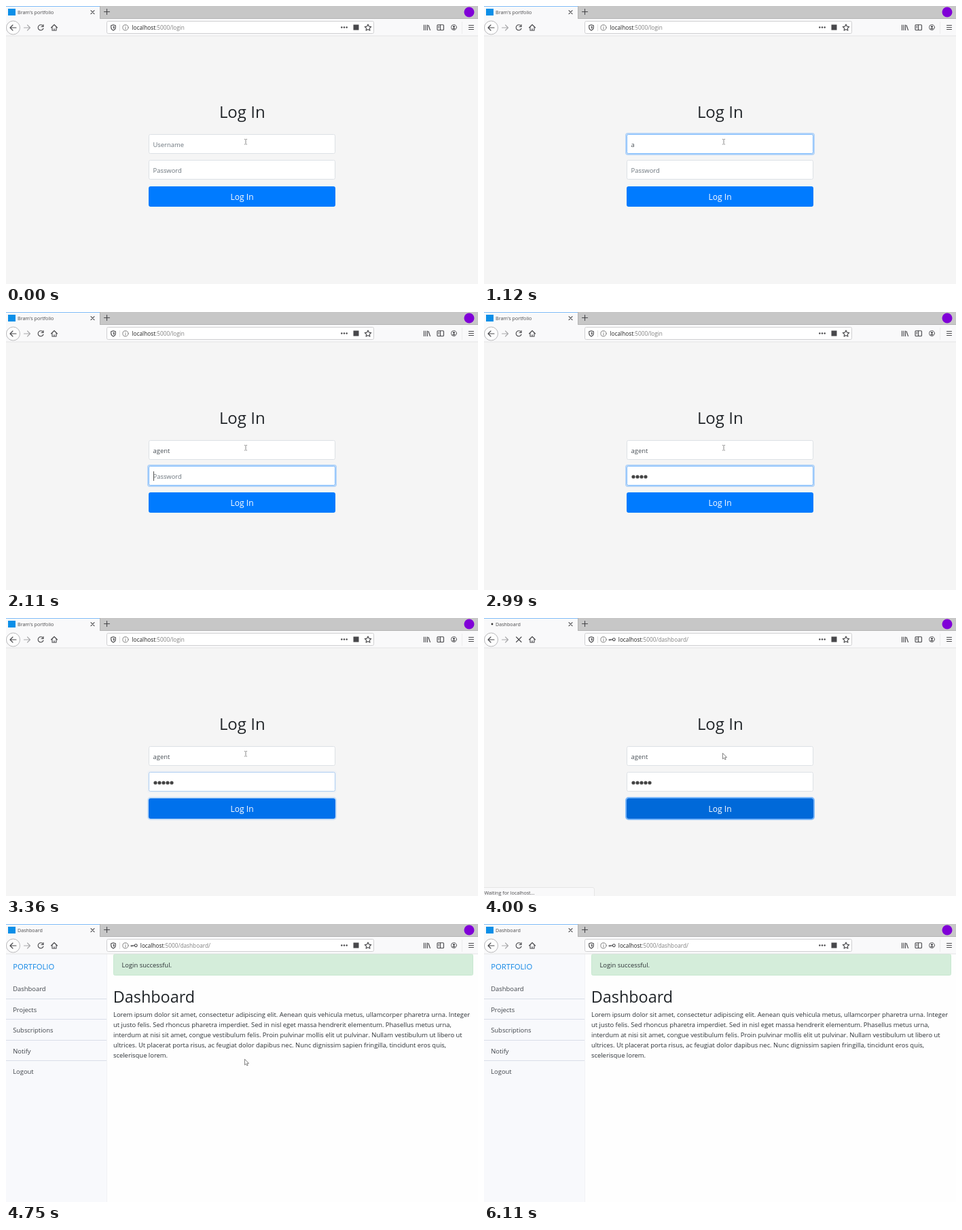
Write an HTML page that moves like this. It is 695 by 410 pixels and loops after 6.25 s.

```html
<!DOCTYPE html>
<html lang="en">
<head>
<meta charset="utf-8">
<title>Login demo</title>
<style>
  html, body { margin: 0; width: 100%; height: 100%; overflow: hidden; background: #f5f5f5; }
  svg { display: block; width: 695px; height: 410px; }
  text { font: 9.41px "Open Sans", "Noto Sans", sans-serif; fill: #2b3035; white-space: pre; }
  .tab { font-size: 7.15px; fill: #4a4a4c; }
  .url { font-size: 8.25px; fill: #808080; }
  .url tspan { fill: #222; }
  .title { font-size: 24px; fill: #212529; }
  .field { fill: #fff; stroke: #dde1e6; }
  .field + text { fill: #495057; }
  .field + text.hint, .hint { fill: #6c757d; }
  .ring { fill: none; stroke: #007bff; stroke-width: 2; }
  .edge { fill: none; stroke: #80bdff; }
  .icon { fill: none; stroke: #48484b; stroke-width: 1.1; stroke-linecap: round; stroke-linejoin: round; }
  .dim { stroke: #a8a8aa; }
  .solid { fill: #48484b; stroke: none; }
  #menu text { fill: #40454b; }
</style>
</head>
<body>
<svg viewBox="0 0 695 410">
  <defs><clipPath id="tabClip"><path d="M0 1H138V18H0z"/></clipPath></defs>

  <g id="login" data-on="0-4120">
    <rect y="44" width="695" height="366" fill="#f5f5f5"/>
    <text class="title" x="347.8" y="165" text-anchor="middle">Log In</text>

    <rect class="field" x="210.5" y="189.5" width="274" height="28" rx="2"/>
    <text id="user" x="216.5" y="207.5"></text>
    <g id="userFocus">
      <rect class="ring" x="209" y="188" width="277" height="31" rx="3" stroke-opacity=".27"/>
      <rect class="edge" x="210.5" y="189.5" width="274" height="28" rx="2"/>
    </g>

    <rect class="field" x="210.5" y="227.5" width="274" height="28" rx="2"/>
    <text class="hint" x="216.5" y="246" data-on="0-2360">Password</text>
    <g fill="#444">
      <circle cx="220" cy="243" r="2.6" data-on="2360-4120"/>
      <circle cx="226" cy="243" r="2.6" data-on="2610-4120"/>
      <circle cx="232" cy="243" r="2.6" data-on="2740-4120"/>
      <circle cx="238" cy="243" r="2.6" data-on="2990-4120"/>
      <circle cx="244" cy="243" r="2.6" data-on="3110-4120"/>
    </g>
    <g id="passFocus">
      <rect id="passRing" class="ring" x="209" y="226" width="277" height="31" rx="3" stroke-opacity=".27"/>
      <rect class="edge" x="210.5" y="227.5" width="274" height="28" rx="2"/>
    </g>
    <rect id="caret" width="1" height="14" fill="#555"/>

    <rect id="btnRing" class="ring" x="209" y="265" width="277" height="32" rx="4" stroke-opacity=".5"/>
    <rect id="btn" x="210" y="266" width="275" height="30" rx="3"/>
    <text x="347.6" y="286.4" text-anchor="middle" style="font-size:12.05px;fill:#fff">Log In</text>
  </g>

  <g data-on="4120-6250">
    <path d="M148 44H695V410H148z" fill="#fefefe"/>
    <path d="M0 44H148V410H0z" fill="#f8f9fc"/>
    <path d="M148.5 44V410" stroke="#f1f2f5"/>
    <text x="10.2" y="67" style="font-size:11.25px;fill:#0b84e5">PORTFOLIO</text>
    <g id="menu"></g>
    <path d="M0 110.5H148M0 140.5H148M0 171.5H148M0 201.5H148" stroke="#d9dee8"/>
    <rect x="158.5" y="44.5" width="529" height="31" rx="2" fill="#d4edda" stroke="#c8e8d0"/>
    <text x="170.4" y="64.1">Login successful.</text>
    <text x="157.7" y="116" class="title" style="font-size:23.4px">Dashboard</text>
    <g id="copy"></g>
  </g>

  <g id="status" data-on="3750-4120">
    <path d="M-1 397.5H160Q162.5 397.5 162.5 400V411H-1z" fill="#f9f9fa" stroke="#e6e6e6"/>
    <text class="tab" x=".5" y="407.5">Waiting for localhost...</text>
  </g>

  <g id="chrome">
    <path d="M0 0H695V19H0z" fill="#c7c7c7"/>
    <path d="M0 0H138V19H0z" fill="#f9f9fa"/>
    <path d="M0 .5H138" stroke="#7fbcf8"/>
    <path d="M138.5 0V18.5H695" fill="none" stroke="#b3b3b3"/>
    <circle id="burst" cx="8" cy="9" fill="#a6d0fc" clip-path="url(#tabClip)"/>
    <path d="M3 4h11v10h-11z" fill="#0b8fe8" data-on="0-3750 4120-6250"/>
    <circle id="spinner" cy="9" r="1.4" fill="#333" data-on="3750-4120"/>
    <text class="tab" x="17" y="12" data-on="0-4000">Bram's portfolio</text>
    <text class="tab" x="17" y="12" data-on="4000-6250">Dashboard</text>
    <path class="icon" d="M125 6.7l5 5m0-5l-5 5M144.5 8.5h8M148.5 4.5v8"/>
    <circle cx="682" cy="9" r="7.5" fill="#8000d7"/>

    <path d="M0 19H695V44H0z" fill="#f9f9fa"/>
    <path d="M0 44H695" stroke="#e4e4e5"/>
    <circle cx="10.5" cy="32" r="10" fill="#fdfdfd" stroke="#b9b9bb"/>
    <path class="icon" d="M15 32H6.5M10 28L6 32L10 36" stroke-width="1.4"/>
    <path class="icon dim" d="M26.5 32H35M31.5 28L35.5 32L31.5 36"/>
    <path id="reload" class="icon" d="M54.5 29.5A4 4 0 1 0 55 33M55 27.5V30.5H52" data-on="0-3750 4380-6250"/>
    <path id="stop" class="icon" d="M47.5 28l7.5 7.5m0-7.5l-7.5 7.5" data-on="3750-4380"/>
    <path class="icon" d="M66.5 32L71 27.5L75.5 32M68 31.5V36H74V31.5M71 36V33.5"/>

    <rect x="148.5" y="22.5" width="393" height="18" rx="2" fill="#fff" stroke="#cfcfd1"/>
    <path class="icon" d="M158 27.7l3.3 1v2.8q0 3-3.3 4.5q-3.3-1.5-3.3-4.5v-2.8z"/>
    <path class="solid" d="M158 29.5l1.500.5v1.700q0 1.500-1.500 2.300z"/>
    <path d="M167.5 27V37" stroke="#e0e0e0"/>
    <g class="icon" style="stroke:#777;stroke-width:.9">
      <circle cx="176" cy="31.8" r="4.1"/>
      <path d="M176 31.5V34M176 29.6V29.7"/>
    </g>
    <text class="url" x="185.5" y="35.3" data-on="0-4000"><tspan>localhost</tspan>:5000/login</text>
    <g data-on="4000-6250">
      <circle class="icon" cx="191.3" cy="31.7" r="1.9"/>
      <path class="icon" d="M189.3 31.7H184M184.5 31.7V33.2M186.7 31.7V33"/>
      <text class="url" x="197.8" y="35.3"><tspan>localhost</tspan>:5000/dashboard/</text>
    </g>
    <g class="solid">
      <circle cx="494.3" cy="31.5" r="1.2"/>
      <circle cx="498" cy="31.5" r="1.2"/>
      <circle cx="501.7" cy="31.5" r="1.2"/>
      <rect x="511.5" y="27.5" width="8" height="8"/>
    </g>
    <path class="icon" d="M533 27l1.4 3.1 3.3.4-2.4 2.3.6 3.3-2.9-1.6-2.9 1.6.6-3.3-2.4-2.3 3.3-.4z"/>
    <path class="icon" d="M615.5 28V35.5M618 28V35.5M620.5 28V35.5M622 28.5L624.5 35.5"/>
    <g class="icon">
      <rect x="635" y="27.7" width="9.5" height="7.8" rx="1"/>
      <path d="M639.5 28V35.3M636.7 30H637.8M636.7 32H637.8"/>
      <circle cx="659.5" cy="31.5" r="4" style="stroke-width:.9"/>
      <path d="M681.5 28.5H688.5M681.5 31.5H688.5M681.5 34.5H688.5"/>
    </g>
    <path class="solid" d="M657.3 33.8q0-1.3 2.2-1.3t2.2 1.3q-2.2 1.6-4.4 0z"/>
    <circle class="solid" cx="659.5" cy="30.5" r="1.4"/>
    <path d="M671.5 23V41" stroke="#ececec"/>
  </g>

  <path d="M351 196.5H352.5M353.5 196.5H355M353 197V203.5M351 204H352.5M353.5 204H355" fill="none" stroke="#888" data-on="0-3750"/>
  <path id="arrow" d="M0 0V8.6L2 6.9L3.3 9.6L4.7 9L3.4 6.3H6z" fill="#fff" stroke="#666" stroke-width=".8" data-on="3750-6110"/>
</svg>
<script>
const LOOP = 6250;
const $ = id => document.getElementById(id);
const set = (id, attrs) => {
  for (const k in attrs) $(id).setAttribute(k, attrs[k]);
};
// value of the last step that has started
const at = (steps, t) => steps.reduce((v, s) => t >= s[0] ? s[1] : v, steps[0][1]);

const svgText = (parent, str, x, y) => {
  const el = document.createElementNS("http://www.w3.org/2000/svg", "text");
  el.setAttribute("x", x);
  el.setAttribute("y", y);
  el.textContent = str;
  $(parent).append(el);
};
["Dashboard", "Projects", "Subscriptions", "Notify", "Logout"]
  .forEach((s, i) => svgText("menu", s, 10.2, 99.1 + i * 30.5));
[
  "Lorem ipsum dolor sit amet, consectetur adipiscing elit. Aenean quis vehicula metus, ullamcorper pharetra urna. Integer",
  "ut justo felis. Sed rhoncus pharetra imperdiet. Sed in nisl eget massa hendrerit elementum. Phasellus metus urna,",
  "interdum at nisi sit amet, congue vestibulum felis. Proin pulvinar mollis elit ut pulvinar. Nullam vestibulum ut libero ut",
  "ultrices. Ut placerat porta risus, ac feugiat dolor dapibus nec. Nunc dignissim sapien fringilla, tincidunt eros quis,",
  "scelerisque lorem."
].forEach((s, i) => svgText("copy", s, 158, 136.8 + i * 15));

const timed = [...document.querySelectorAll("[data-on]")].map(el => ({
  el, spans: el.dataset.on.split(" ").map(s => s.split("-").map(Number))
}));

const NAME = "agent";
const letters = [[0, 0], [1120, 1], [1380, 2], [1500, 3], [1750, 4], [1880, 5]];
const userFocus = [[0, 0], [130, .5], [260, 1], [1990, .5], [2110, 0]];
const passFocus = [[0, 0], [1990, .5], [2110, 1], [3360, .5], [3500, 0]];
const btnFocus = [[0, 0], [3360, .4], [3500, 1]];
const btnFill = [[0, "#007bff"], [3360, "#0071ec"], [3500, "#0069d9"]];
const userCaret = [[0, 0], [130, 1], [620, 0], [1380, 1], [1500, 0]];
const passCaret = [[0, 0], [1990, 217], [2360, 0], [2740, 235], [2990, 0], [3110, 247], [3360, 0]];
const burst = [[0, [0, 0]], [4120, [38, 1]], [4250, [70, .6]], [4380, [93, .25]], [4510, [0, 0]]];
const spinner = [[0, 6], [3870, 9], [4000, 12]];

function drawForm(t) {
  const n = at(letters, t), user = $("user");
  user.textContent = n ? NAME.slice(0, n) : "Username";
  user.setAttribute("class", n ? "" : "hint");

  const inUser = at(userCaret, t), passX = at(passCaret, t);
  const userX = n ? Math.round(216.5 + user.getComputedTextLength()) : 217;
  set("caret", { x: inUser ? userX : passX, y: inUser ? 196 : 235, opacity: inUser || passX ? 1 : 0 });

  set("userFocus", { opacity: at(userFocus, t) });
  set("passFocus", { opacity: at(passFocus, t) });
  set("passRing", { opacity: t >= 3360 ? .2 : 1 });
  set("btnRing", { opacity: at(btnFocus, t) });
  set("btn", { fill: at(btnFill, t) });
}

function drawPointer(t) {
  let x = 351.5, y = 199.3;
  if (t >= 5360) {
    const k = Math.max(0, Math.floor((t - 5390) / 120)) / 5;
    const p = k * k * (3 - 2 * k);
    x = 354.5 + 220 * p;
    y = 199.8 + 177 * p;
  }
  set("arrow", { transform: `translate(${x} ${y})` });
}

function draw(t) {
  for (const { el, spans } of timed)
    el.style.display = spans.some(([a, b]) => t >= a && t < b) ? "" : "none";
  drawForm(t);
  drawPointer(t);
  const [r, opacity] = at(burst, t);
  set("burst", { r, opacity });
  set("spinner", { cx: at(spinner, t) });
  set("stop", { class: t >= 4120 ? "icon dim" : "icon" });
  set("reload", { class: t >= 4380 && t < 4750 ? "icon dim" : "icon" });
}

const start = performance.now();
function tick() {
  draw((performance.now() - start) % LOOP);
  requestAnimationFrame(tick);
}
tick();
</script>
</body>
</html>
```
